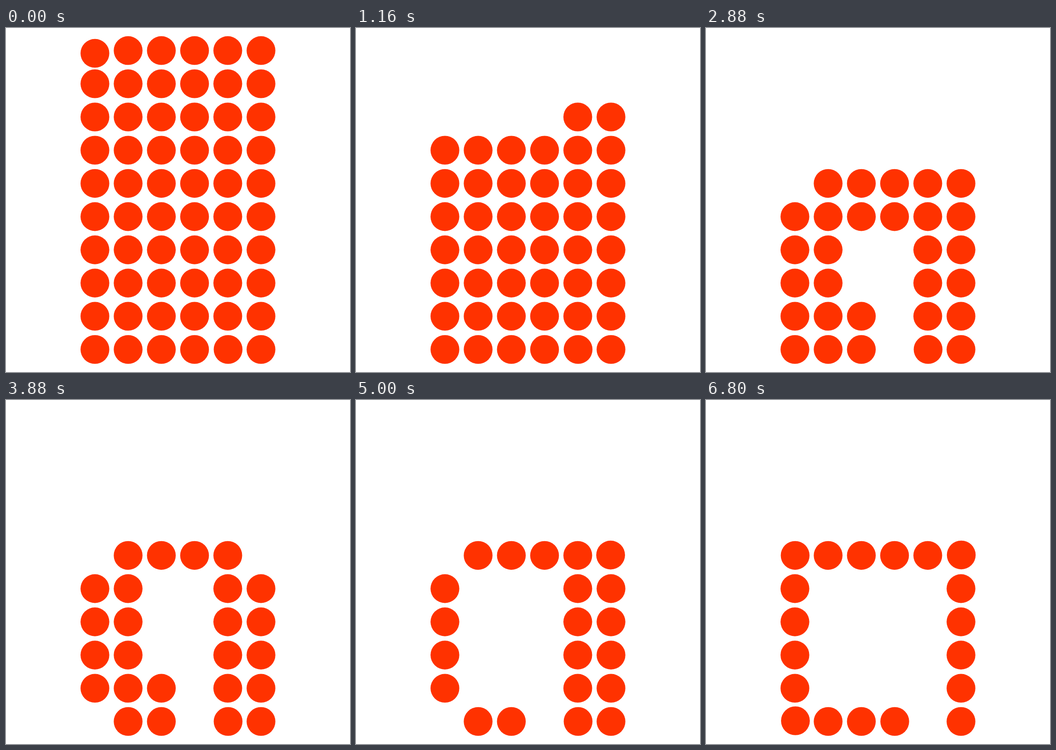
An HTML page for the animation above (7.68 s loop, 748 px wide and 748 px high).

```html
<!DOCTYPE html>
<html lang="en">
<head>
<meta charset="utf-8">
<title>Dot grid</title>
<style>
  html, body { margin: 0; width: 100%; height: 100%; overflow: hidden; background: #fff; }
  svg { display: block; width: 100%; height: 100%; fill: #ff3200; }
</style>
</head>
<body>
<svg id="stage" viewBox="0 0 748 748"></svg>
<script>
const LOOP = 7680, STEP = 40;
const COLS = 6, ROWS = 10, PITCH = 72.22, RADIUS = 31.3;
const stage = document.getElementById('stage');

const dots = {};
const steps = [];

function addDot(id, row, col, dx = 0, dy = 0) {
  const el = document.createElementNS('http://www.w3.org/2000/svg', 'circle');
  el.setAttribute('r', RADIUS);
  el.setAttribute('cx', 193.35 + col * PITCH + dx);
  el.setAttribute('cy', 49.05 + row * PITCH + dy);
  stage.append(el);
  dots[id] = el;
}

for (let row = 0; row < ROWS; row++) {
  for (let col = 0; col < COLS; col++) {
    const dy = row + col === 0 ? 6 : 0;
    const dx = row === 9 && col === 4 ? 0.7 : 0;
    addDot(`${row}${col}`, row, col, dx, dy);
  }
}

// Dots that come in later, placed slightly off the grid.
addDot('foot', 9, 3, 0.4);
addDot('slideA', 9, 3.67);
addDot('slideB', 9, 3.33);
addDot('shoulder', 4, 5, -0.8, -0.8);
addDot('topLeft', 4, 0, 0.5);
addDot('topRight', 4, 5, 0.6, -1);
addDot('bottomLeft', 9, 0, 1.1, -1.5);
const late = ['foot', 'slideA', 'slideB', 'shoulder', 'topLeft', 'topRight', 'bottomLeft'];

// One word per step; "-" hides, "+" shows, commas join changes in one step.
function sequence(start, text) {
  text.split(' ').forEach((word, i) => steps.push({ at: start + i * STEP, ops: word.split(',') }));
}

const upper = Array.from({ length: 24 }, (_, i) => `-${Math.floor(i / COLS)}${i % COLS}`);
sequence(560, upper.join(' '));
sequence(1520, '-62 -63 -72 -73 -83 -93');
sequence(2880, '-40 -45 -90');
sequence(3840, '-52 -53 -82 -94,+slideA -slideA,+slideB -slideB,+foot');
sequence(4800, '-51 -61 -71 -81 +shoulder -foot,+94');
sequence(5760, '-shoulder -54 -64 -74 -84,-94,+foot');
sequence(6720, '+topLeft +topRight +bottomLeft');

function draw(now) {
  const t = now % LOOP;
  const hidden = new Set(late);
  for (const { at, ops } of steps) {
    if (at > t) break;
    for (const op of ops) {
      const id = op.slice(1);
      if (op[0] === '-') hidden.add(id);
      else hidden.delete(id);
    }
  }
  for (const id in dots) dots[id].style.display = hidden.has(id) ? 'none' : '';
}

const origin = performance.now();
function tick() {
  draw(performance.now() - origin);
  requestAnimationFrame(tick);
}
tick();
</script>
</body>
</html>
```
